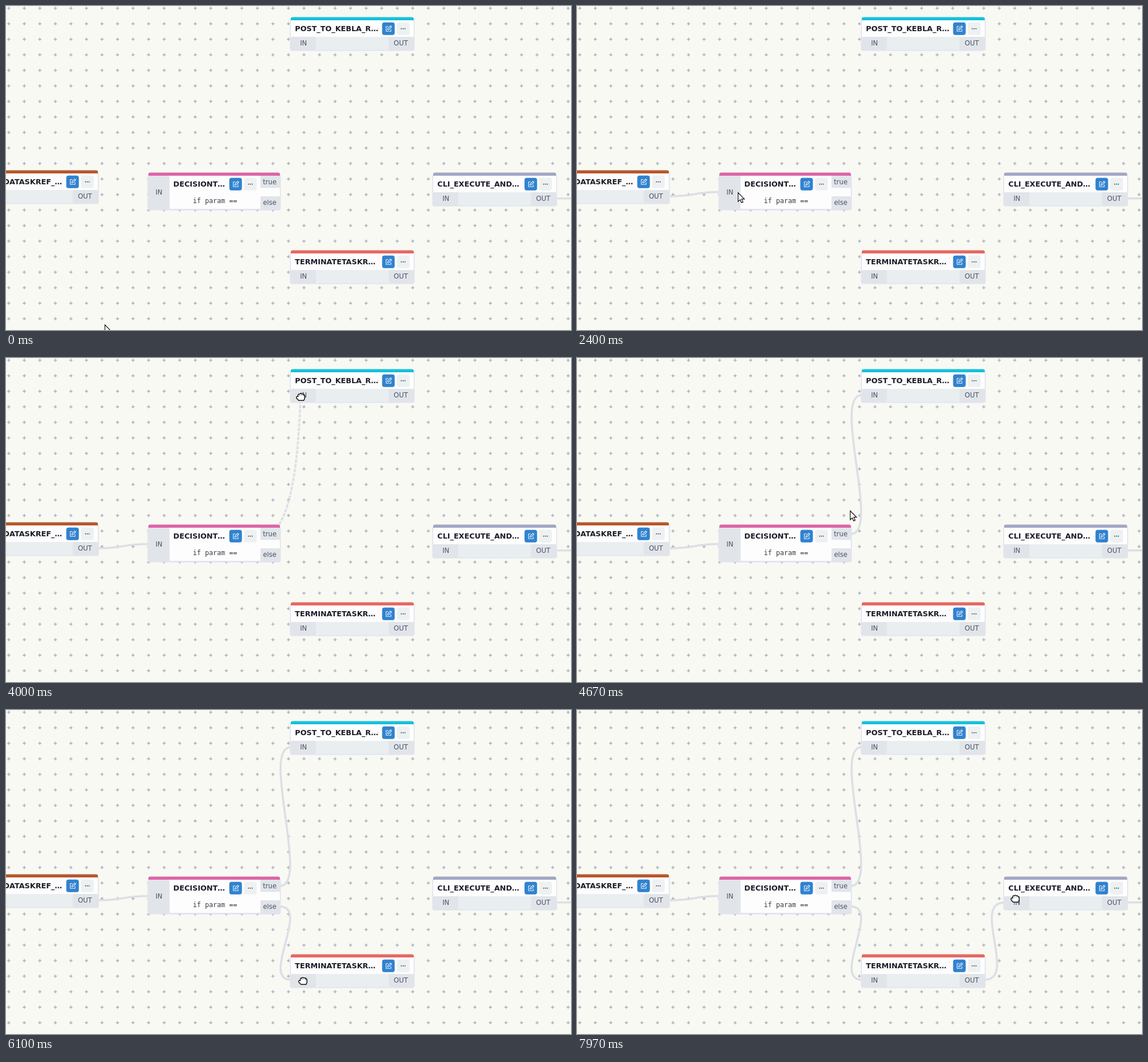
Animation, 988 px wide and 567 px high, one loop 8 s. Source, as an HTML page:

```html
<!DOCTYPE html>
<html lang="en">
<head>
<meta charset="utf-8">
<title>Workflow editor</title>
<style>
  html, body { margin: 0; width: 100%; height: 100%; overflow: hidden; background: #f8f9f2; }
  svg { display: block; width: 100vw; height: 100vh; }
  text { font-family: "DejaVu Sans", sans-serif; }
  .title { font-size: 12.75px; font-weight: bold; fill: #1b1c29; }
  .port { font-size: 11.6px; fill: #4b5264; text-anchor: middle; }
  .code { font: 11.7px "DejaVu Sans Mono", monospace; fill: #383d49; text-anchor: middle; }
  .link { fill: none; stroke: #dcdfe6; stroke-width: 3.6; }
</style>
</head>
<body>
<svg id="stage" viewBox="0 0 988 567">
  <defs>
    <pattern id="grid" x="18.4" y="17.4" width="27.17" height="27.17" patternUnits="userSpaceOnUse">
      <path d="M13.6 10.8v5.6M10.8 13.6h5.6" stroke="#9c9db8" stroke-width="1.2"/>
    </pattern>
  </defs>
  <rect width="988" height="567" fill="#f8f9f2"/>
  <rect width="988" height="567" fill="url(#grid)"/>
  <g id="links"></g>
  <g id="nodes"></g>
  <g id="arrow">
    <path d="M0 0V15.5L3.6 12.2 6 17.6 8.6 16.4 6.2 11.2H11Z" fill="#fff" stroke="#111" stroke-width="1.2"/>
  </g>
  <g id="fist" fill="#fff" stroke="#111" stroke-width="1.5" stroke-linejoin="round">
    <path d="M-4.3 -.6V-3Q-4 -5.6 -1.8 -4.8Q.2 -6.6 2.2 -5Q4.2 -5.8 5 -3.8Q7.3 -3.8 7.3 -1.2V2.2Q7 4.6 5.6 6.2H-3.4Q-4.5 4.4 -6.4 3.2Q-8 .2 -6 -.8Q-4.9 -1.2 -4.3 -.6Z"/>
    <path d="M-1.5 -3.4v1.4M1.9 -3.4v1.4M4.9 -2.9v1.2" stroke-width=".8"/>
  </g>
</svg>
<script>
const LOOP = 8000;
const $ = id => document.getElementById(id);
const CELL = '#e1e5ea';

function add(parent, tag, attrs, label) {
  const el = document.createElementNS('http://www.w3.org/2000/svg', tag);
  for (const k in attrs) el.setAttribute(k, attrs[k]);
  if (label) el.textContent = label;
  parent.appendChild(el);
  return el;
}
const box = (g, x, y, width, height, fill, rx = 0) => add(g, 'rect', { x, y, width, height, fill, rx });
const label = (g, x, y, cls, str) => add(g, 'text', { x, y, class: cls }, str);

// centred on the blue button
function buttons(g, x, y) {
  box(g, x - 11, y - 11, 22, 22, '#3182ce', 4);
  const icon = { fill: 'none', stroke: '#e8f3ff', 'stroke-width': 1.1, 'stroke-linejoin': 'round' };
  add(g, 'path', { ...icon, d: `M${x - .2} ${y - 4}h-3.8v8.4h8.4v-3.8` });
  add(g, 'path', { ...icon, d: `M${x - 1.5} ${y + 1.9}l.5-2.3 4.7-4.7 1.8 1.8-4.7 4.7z` });
  box(g, x + 14.9, y - 11, 22, 22, '#edf1f1', 4);
  for (const i of [-1, 0, 1])
    add(g, 'circle', { cx: x + 25.8 + i * 3.2, cy: y, r: 1, fill: '#4a5060' });
}

function frame(g, x, y, w, h, color) {
  box(g, x - 1.5, y + 2, w + 3, h - .5, '#dfe2ef', 4);
  box(g, x, y, w, h - 1, '#fdfdfd', 3);
  add(g, 'path', { d: `M${x} ${y + 5}v-2.5q0-3 3-3h${w - 6}q3 0 3 3v2.5z`, fill: color });
}

function task(x, y, color, name, endX) {
  const g = add($('nodes'), 'g', {});
  frame(g, x, y, 215, 57, color);
  box(g, x, y + 34, 215, 23, '#e9eef1', 2);
  box(g, x - .5, y + 34, 44.5, 23, CELL, 2);
  box(g, x + 171, y + 34, 44.8, 23, CELL, 2);
  const title = label(g, endX || x + 7.3, y + 24.2, 'title', name);
  if (endX) title.setAttribute('text-anchor', 'end');
  label(g, x + 22.2, y + 49, 'port', 'IN');
  label(g, x + 192.4, y + 49, 'port', 'OUT');
  buttons(g, x + 170.7, y + 19.8);
}

function decision(x, y) {
  const g = add($('nodes'), 'g', {});
  frame(g, x, y, 230, 64, '#de64a8');
  box(g, x - .5, y + 5, 37.5, 59.3, CELL, 2);
  box(g, x + 196, y + 5, 34.5, 21.3, CELL);
  box(g, x + 196, y + 41, 34.5, 22.5, CELL, 2);
  label(g, x + 18.5, y + 37.6, 'port', 'IN');
  label(g, x + 212.2, y + 20.3, 'port', 'true');
  label(g, x + 212.2, y + 56.3, 'port', 'else');
  label(g, x + 43.6, y + 24.2, 'title', 'DECISIONT…');
  label(g, x + 116.5, y + 53.4, 'code', 'if param ==');
  buttons(g, x + 152.5, y + 19.8);
}

task(498, 20, '#16c1dc', 'POST_TO_KEBLA_R…');
task(-54.3, 288, '#b7572c', 'DATASKREF_…', 98);
decision(249, 292);
task(747, 292, '#a1a7c4', 'CLI_EXECUTE_AND…');
task(498, 428, '#e76762', 'TERMINATETASKR…');

// port: grab point, out: node edge, to: target edge
const drags = [
  { start: 1400, end: 2250, port: 139, out: [161, 333], to: [249, 325.5], bend: 46 },
  { start: 3230, end: 4150, port: 461, out: [479, 308], to: [498, 65], bend: 53 },
  { start: 5300, end: 6000, port: 461, out: [479, 344], to: [498, 472], bend: 53 },
  { start: 7040, end: 7750, port: 691, out: [713, 472], to: [747, 337], bend: 57 }
];
for (const d of drags) d.el = add($('links'), 'path', { class: 'link' });
add($('links'), 'path', { class: 'link', d: 'M963 336.7H990' });

const ease = {
  io: u => u * u * (3 - 2 * u),
  in: u => u * u,
  out: u => 1 - (1 - u) * (1 - u)
};
// time, x, y, easing towards this key
const keys = [
  [0, 173, 558], [200, 173, 558, 'io'], [1150, 151.5, 340.3, 'io'], [1380, 151.5, 340.3, 'io'],
  [2050, 267, 328, 'io'], [2300, 267, 328, 'io'], [2900, 462, 311, 'io'], [3030, 462, 311, 'io'],
  [3200, 466, 257, 'in'], [3700, 515, 68, 'out'], [4250, 515, 68, 'io'],
  [4900, 463, 347, 'io'], [5060, 463, 347, 'io'], [5330, 472.5, 426.6, 'in'],
  [5750, 519, 474, 'out'], [6100, 519, 474, 'io'], [6680, 693, 474, 'io'], [6800, 693, 474, 'io'],
  [7070, 748, 406.6, 'in'], [7500, 766, 330, 'out'], [LOOP, 766, 330, 'io']
];
const holds = [[1250, 2400], [3050, 4300], [5050, 6150], [6800, LOOP]];

function pointer(t) {
  const i = keys.findIndex(k => k[0] > t);
  const a = keys[i - 1], b = keys[i];
  const u = ease[b[3]]((t - a[0]) / (b[0] - a[0]));
  return [a[1] + (b[1] - a[1]) * u, a[2] + (b[2] - a[2]) * u];
}

function linkPath(d, t, x, y) {
  const [ox, oy] = d.out, [tx, ty] = d.to;
  if (t < d.start) return '';
  if (t >= d.end) return `M${ox} ${oy}C${ox + d.bend} ${oy} ${tx - d.bend} ${ty} ${tx} ${ty}`;
  if (t < d.start + 90) return `M${ox} ${oy}h7.5`;
  const dx = x - d.port, dy = y - oy;
  return `M${d.port} ${oy}c${dx * .65} ${dy * .075} ${dx * .93} ${dy * .49} ${dx} ${dy}`;
}

function render(t) {
  const [x, y] = pointer(t);
  const held = holds.some(([a, b]) => t >= a && t < b);
  for (const d of drags) {
    const dragging = t >= d.start + 90 && t < d.end;
    d.el.setAttribute('d', linkPath(d, t, x, y));
    d.el.setAttribute('stroke-dasharray', dragging ? '6 2' : 'none');
  }
  for (const [id, on] of [['fist', held], ['arrow', !held]]) {
    $(id).setAttribute('transform', `translate(${x} ${y})`);
    $(id).setAttribute('display', on ? 'inline' : 'none');
  }
}

const begin = performance.now();
function tick() {
  render((performance.now() - begin) % LOOP);
  requestAnimationFrame(tick);
}
tick();
</script>
</body>
</html>
```
